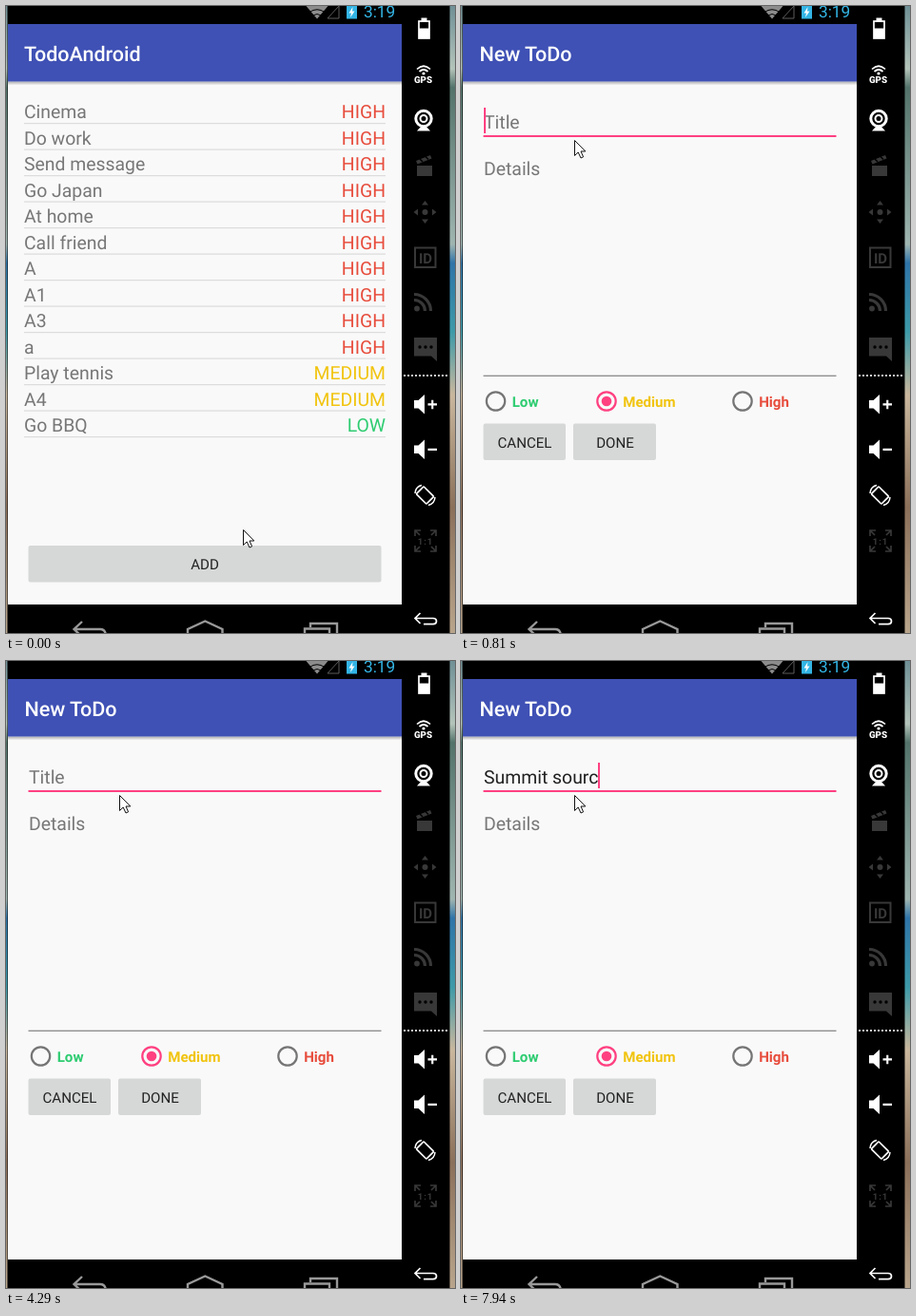
Animation, 472 px wide and 660 px high, one loop 8 s. Source, as an HTML page:

```html
<!DOCTYPE html>
<html lang="en">
<head>
<meta charset="utf-8">
<title>Todo app</title>
<style>
  html, body { margin: 0; width: 100%; height: 100%; overflow: hidden; background: #000; }
  svg { display: block; width: 472px; height: 660px; }
  text { font-family: Roboto, sans-serif; white-space: pre; text-rendering: geometricPrecision; }
  .title { font-size: 21.56px; font-weight: 500; fill: #fff; }
  .body { font-size: 19.4px; fill: #777; }
  .btn { font-size: 15.1px; fill: #222; text-anchor: middle; }
  .radio { font-size: 15.1px; font-weight: 700; }
  .end { text-anchor: end; }
  .tool { fill: none; stroke: #fff; stroke-width: 1.7; }
  .off { fill: #383838; }
  .offline { fill: none; stroke: #383838; stroke-width: 2; }
  .nav { fill: none; stroke: #999; stroke-width: 2.4; }
</style>
</head>
<body>
<svg viewBox="0 0 472 660">
  <defs>
    <linearGradient id="shade" x2="0" y2="1">
      <stop stop-opacity=".3"/><stop offset="1" stop-opacity="0"/>
    </linearGradient>
    <linearGradient id="shore" x2="0" y2="1">
      <stop stop-color="#6f9096"/><stop offset=".1" stop-color="#b4c4ba"/>
      <stop offset=".13" stop-color="#53736a"/><stop offset=".38" stop-color="#9fb5b0"/>
      <stop offset=".41" stop-color="#2f74a8"/><stop offset=".52" stop-color="#3d9aa8"/>
      <stop offset=".62" stop-color="#c9b79d"/><stop offset=".8" stop-color="#8b705a"/>
      <stop offset="1" stop-color="#b9a58c"/>
    </linearGradient>
    <clipPath id="view"><rect x="2" y="19" width="414" height="611"/></clipPath>
  </defs>

  <!-- desktop and emulator window -->
  <rect width="472" height="660" fill="url(#shore)"/>
  <rect x="1.5" width="465" height="660"/>

  <!-- status bar -->
  <path d="M327 13.5L315.5 0H338.5Z" fill="#8c8c8c"/>
  <path d="M319 6.5Q327 1 335 6.5M322.5 10Q327 7 331.5 10" fill="none" stroke="#000"/>
  <path d="M350 0V13H338Z" fill="none" stroke="#5c5c5c"/>
  <rect x="358" y="0" width="11" height="13.5" fill="#33b5e5"/>
  <path d="M364.5 1L360.5 7.5H363L362 12L366.5 5.5H364Z" fill="#fff"/>
  <text x="376" y="12" font-size="17.25" fill="#33b5e5">3:19</text>

  <!-- screen -->
  <g clip-path="url(#view)">
    <g id="list">
      <rect x="2" y="19" width="414" height="611" fill="#f9f9f9"/>
      <rect x="2" y="79.5" width="414" height="4" fill="url(#shade)"/>
      <rect x="2" y="19" width="414" height="60.5" fill="#3f51b5"/>
      <text class="title" x="19" y="57.5">TodoAndroid</text>
      <g id="rows"></g>
      <rect x="23.5" y="568" width="371" height="38.5" rx="2" fill="#d6d7d7"/>
      <text class="btn" x="209" y="593">ADD</text>
    </g>
    <rect id="dim" x="2" y="19" width="414" height="611" opacity=".5"/>
    <g id="form">
      <rect x="2" y="19" width="414" height="611" fill="#f9f9f9"/>
      <rect x="2" y="79.5" width="414" height="4" fill="url(#shade)"/>
      <rect x="2" y="19" width="414" height="60.5" fill="#3f51b5"/>
      <text class="title" x="19.5" y="57.5">New ToDo</text>
      <text id="hint" class="body" x="24" y="128.5">Title</text>
      <text id="entry" class="body" x="24" y="128.5" style="fill:#212121"></text>
      <rect x="23.5" y="136" width="371" height="2" fill="#ff4081"/>
      <rect id="caret" y="107" width="2" height="27" fill="#ff4081"/>
      <text class="body" x="24" y="177.5">Details</text>
      <rect x="23.5" y="388.7" width="371" height="1.1" fill="#757575"/>
      <g id="radios"></g>
      <g fill="#d6d7d7">
        <rect x="23.5" y="439.5" width="86.5" height="38.5" rx="2"/>
        <rect x="118" y="439.5" width="87" height="38.5" rx="2"/>
      </g>
      <text class="btn" x="67" y="465">CANCEL</text>
      <text class="btn" x="162" y="465">DONE</text>
    </g>
  </g>

  <!-- navigation bar -->
  <g class="nav">
    <path d="M80 648L71.5 656L80 664M72 656H99Q105 656 105 664"/>
    <path d="M191 664V656L209.3 647.5L227.5 656V664"/>
    <path d="M314 664V655.5H340V664M320 654V650H348V664"/>
  </g>

  <!-- emulator toolbar -->
  <rect x="436.500" y="12.500" width="6" height="4" fill="#fff"/>
  <rect class="tool" x="434" y="16" width="11" height="18"/>
  <rect x="434" y="23.500" width="11" height="10.500" fill="#fff"/>

  <g class="tool">
    <path d="M432 66.500Q439 60 446 66.500M434.500 69Q439 65 443.500 69"/>
  </g>
  <circle cx="439" cy="71" r="1.600" fill="#fff"/>
  <text x="438.500" y="80.500" font-size="9.800" font-weight="900" fill="#fff" text-anchor="middle">GPS</text>

  <circle cx="439" cy="118.500" r="8.200" class="tool" style="stroke-width:3"/>
  <circle cx="439" cy="118.500" r="3.500" class="tool" style="stroke-width:2"/>
  <path d="M436 127H442L446 131.500H432Z" fill="#fff"/>

  <g class="off">
    <path d="M432 168H448V179H432Z"/>
    <path d="M431 163L446 157L447.500 160.500L432.500 166.500Z"/>
    <path d="M435 161L438 164M441 158.500L444 161.500" stroke="#000" stroke-width="1.500"/>
    <circle cx="440.500" cy="217" r="3"/>
    <path d="M440.500 205L444 209.500H437ZM440.500 229L444 224.500H437ZM428.500 217L433 213.500V220.500ZM452.500 217L448 213.500V220.500Z"/>
    <text x="441" y="270.500" font-size="15" font-weight="700" text-anchor="middle">ID</text>
    <circle cx="432" cy="318.500" r="2.900"/>
    <path d="M429 349H453V374L447 368.500H429Z"/>
    <text x="441" y="567" font-size="9.500" font-weight="700" text-anchor="middle" letter-spacing="1">1:1</text>
  </g>
  <g class="offline">
    <rect x="430" y="254.500" width="21.500" height="20.500"/>
    <path d="M429 309.500A11.500 11.500 0 0 1 440.500 321M429 303.500A17.500 17.500 0 0 1 446.500 321" stroke-width="3.200"/>
    <path d="M430 558V552H436M430 552L435 557M446 552H452V558M452 552L447 557M430 568V574H436M430 574L435 569M446 574H452V568M452 574L447 569" style="stroke-width:1.700"/>
  </g>
  <circle cx="435" cy="359" r="1.700"/><circle cx="441" cy="359" r="1.700"/><circle cx="447" cy="359" r="1.700"/>

  <path d="M418 389H466" stroke="#d0d0d0" stroke-width="2" stroke-dasharray="2 2"/>
  <g fill="#fff">
    <path id="speaker" d="M429 415H433.500L440 409V429.500L433.500 423.500H429Z"/>
    <use href="#speaker" y="47.500"/>
    <path d="M443.500 418.300H453V420.500H443.500ZM447.200 414.700H449.300V424.200H447.200ZM443.500 465.700H453V468H443.500Z"/>
  </g>

  <g class="tool">
    <rect x="435" y="507.500" width="11" height="15" rx="1" transform="rotate(-45 440.500 515)"/>
    <path d="M430 513Q430.500 506 437 504.500M451 517Q450.500 524 444 525.500" stroke-width="1.500"/>
    <path d="M435.500 639L430 644.500L435.500 650M430 644.500H449Q452.500 644.500 452.500 647.500T449 650.700H439"/>
  </g>

  <path id="cursor" d="M.5 .5V16.500L4.200 13L7 19L9.600 17.800L7 12H11.800Z" fill="#fff" stroke="#111"/>
</svg>
<script>
  const $ = id => document.getElementById(id);
  const LOOP = 8000;
  const levels = { HIGH: '#e74c3c', MEDIUM: '#f1c40f', LOW: '#2ecc71' };
  const todos = ['Cinema', 'Do work', 'Send message', 'Go Japan', 'At home', 'Call friend',
    'A', 'A1', 'A3', 'a', 'Play tennis', 'A4', 'Go BBQ'];

  $('rows').innerHTML = todos.map((name, i) => {
    const level = i < 10 ? 'HIGH' : i < 12 ? 'MEDIUM' : 'LOW';
    const y = 118 + 27.5 * i;
    return `<text class="body" x="19" y="${y}">${name}</text>
      <text class="body end" x="399" y="${y}" style="fill:${levels[level]}">${level}</text>
      <rect x="19" y="${y + 5}" width="380" height="1.2" fill="#dcdcdc"/>`;
  }).join('');

  $('radios').innerHTML = [['Low', 36.5], ['Medium', 153], ['High', 296]].map(([name, x]) => {
    const picked = name === 'Medium';
    return `<circle cx="${x}" cy="416" r="9.7" fill="none" stroke-width="2.2" stroke="${picked ? '#ff4081' : '#757575'}"/>
      ${picked ? `<circle cx="${x}" cy="416" r="5.3" fill="#ff4081"/>` : ''}
      <text class="radio" x="${x + 17.2}" y="421.5" fill="${levels[name.toUpperCase()]}">${name}</text>`;
  }).join('');

  const phrase = 'Summit sourc';
  const keyTimes = [5380, 5530, 5800, 6080, 6200, 6330, 6470, 7130, 7420, 7550, 7690, 7940];
  const blinks = [420, 810, 1360, 1890, 2320, 2840, 3430, 3860, 4290, 4850, 7010, 7130];
  const pointer = [[0, 249, 551], [150, 245, 522], [300, 262, 400], [420, 278, 264],
    [570, 148, 184], [690, 112, 146], [810, 119, 141]];

  const passed = (times, t) => times.filter(at => at <= t).length;
  const show = (id, on) => $(id).setAttribute('visibility', on ? 'visible' : 'hidden');
  let typed = -1;

  function draw(t) {
    const opening = t >= 150 && t < 300;
    show('dim', opening);
    $('form').style.display = t < 150 ? 'none' : '';
    $('form').setAttribute('opacity', opening ? .86 : 1);
    $('form').setAttribute('transform',
      opening ? 'translate(208.5 324.5) scale(.9735) translate(-209 -324.5)' : '');

    const count = passed(keyTimes, t);
    if (t >= 150 && count !== typed) {
      typed = count;
      const entry = $('entry');
      entry.textContent = phrase.slice(0, count);
      $('hint').style.display = count ? 'none' : '';
      $('caret').setAttribute('x', Math.round(23.7 + (count ? entry.getComputedTextLength() : 0)));
    }
    $('caret').style.display = passed(blinks, t) % 2 ? 'none' : '';

    const [, x, y] = pointer[passed(pointer.map(p => p[0]), t) - 1];
    $('cursor').setAttribute('transform', `translate(${x} ${y})`);
  }

  const start = performance.now();
  function tick() {
    draw((performance.now() - start) % LOOP);
    requestAnimationFrame(tick);
  }
  tick();
</script>
</body>
</html>
```
